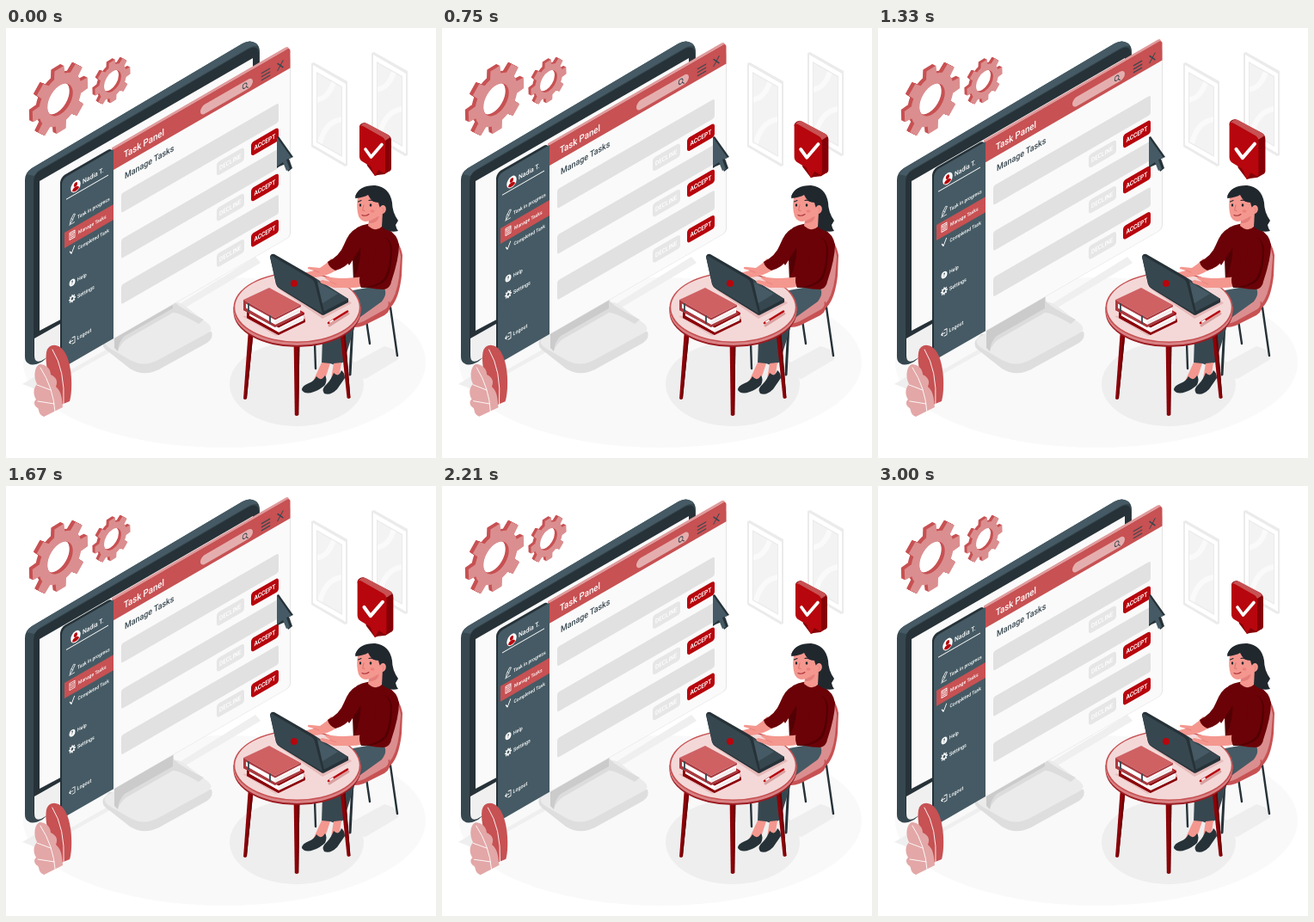
Animation of 500 by 500 pixels, one loop 3040 ms. Source, as an HTML page with a canvas:

```html
<!DOCTYPE html>
<html lang="en">
<head>
<meta charset="utf-8">
<title>Task panel</title>
<style>
html, body { margin: 0; width: 100%; height: 100%; overflow: hidden; background: #fff; }
canvas { display: block; width: 500px; height: 500px; }
</style>
</head>
<body>
<canvas id="stage"></canvas>
<script>
const LOOP = 3040, CYCLE = 3000, SLOPE = 0.577;
const canvas = document.getElementById('stage');
const dpr = Math.max(1, window.devicePixelRatio || 1);
canvas.width = canvas.height = 500 * dpr;
const ctx = canvas.getContext('2d');

const DARK = '#263238', SLATE = '#37474f', STEEL = '#455a64';
const RED = '#b7060d', ROSE = '#c75153', PINK = '#db8e8f', BLUSH = '#f4d8d8';
const SKIN = '#f4978f', WINE = '#6b0207', HAIR = '#20282d';

function fill(color, d) {
  ctx.fillStyle = color;
  ctx.fill(new Path2D(d));
}
function line(color, width, d) {
  ctx.strokeStyle = color;
  ctx.lineWidth = width;
  ctx.lineCap = ctx.lineJoin = 'round';
  ctx.stroke(new Path2D(d));
}
function oval(color, x, y, rx, ry, turn = 0) {
  ctx.fillStyle = color;
  ctx.beginPath();
  ctx.ellipse(x, y, rx, ry, turn, 0, Math.PI * 2);
  ctx.fill();
}
function group(draw, ...matrix) {
  ctx.save();
  ctx.transform(...matrix);
  draw();
  ctx.restore();
}
// Value of piecewise linear keys [[p, v], ...] at p.
function keyed(keys, p) {
  for (let i = 1; i < keys.length; i++) {
    const [p0, v0] = keys[i - 1], [p1, v1] = keys[i];
    if (p <= p1) return v0 + (v1 - v0) * (p - p0) / (p1 - p0);
  }
  return keys[keys.length - 1][1];
}

// Panel plane: x is the screen x, v is the height measured at x = 125.
const onPlane = (x, v) => v - SLOPE * (x - 125);
function slab(color, x0, x1, v0, v1, r = 0) {
  group(() => {
    ctx.fillStyle = color;
    ctx.beginPath();
    ctx.roundRect(x0, v0, x1 - x0, v1 - v0, r);
    ctx.fill();
  }, 1, -SLOPE, 0, 1, 0, 125 * SLOPE);
}
function label(text, x, v, size, color = '#fff', weight = 500) {
  group(() => {
    ctx.font = `${weight} ${size}px Roboto, "Open Sans", sans-serif`;
    ctx.fillStyle = color;
    ctx.fillText(text, 0, size * 0.36);
  }, 0.866, -0.5, 0, 1, x, onPlane(x, v));
}
function icon(x, v, draw) {
  group(draw, 0.866, -0.5, 0, 1, x, onPlane(x, v));
}

function gearPath(r, root, hole, phase) {
  const path = new Path2D();
  for (let i = 0; i < 8; i++) {
    const a = phase + i * Math.PI / 4;
    [[-0.25, root], [-0.17, r], [0.17, r], [0.25, root]].forEach(([da, q]) =>
      path.lineTo(q * Math.cos(a + da), q * Math.sin(a + da)));
    path.arc(0, 0, root, a + 0.25, a + Math.PI / 4 - 0.25);
  }
  path.closePath();
  path.moveTo(hole, 0);
  path.arc(0, 0, hole, 0, Math.PI * 2);
  return path;
}
function gear(x, y, r, root, hole, depth) {
  const path = gearPath(r, root, hole, -47 * Math.PI / 180);
  for (let k = depth; k >= 0; k -= 0.5) {
    group(() => {
      ctx.fillStyle = k ? ROSE : PINK;
      ctx.fill(path, 'evenodd');
    }, 0.866, -0.5, 0, 1, x - k, y - k * 0.5);
  }
}

function wallPicture(x, y) {
  group(() => {
    fill('#ebebeb', 'M-1 -1 L2 -2 L41 20 V118 L38 119 L-1 96Z');
    fill('#fff', 'M1 1 L39 23 V116 L1 94Z');
    fill('#ebebeb', 'M5 9 L35 26 V108 L5 91Z');
    fill('#f3f3f3', 'M6 11 L34 27 V106 L6 90Z');
    ctx.save();
    ctx.clip(new Path2D('M6 11 L34 27 V106 L6 90Z'));
    line('#fafafa', 6, 'M4 42 Q20 40 26 18 M8 96 Q14 66 36 64');
    ctx.restore();
  }, 1, 0, 0, 1, x, y);
}

function floor() {
  oval('#f9f9f9', 254, 389, 234, 99);
  fill('#efefef', 'M19 414 L36 404 L64 404 L120 372 L290 266 L296 273 L130 372 L40 422Z');
  oval('#eeeeee', 338, 414, 78, 49);
  fill('#eeeeee', 'M385 400 L440 370 Q462 376 455 386 L418 408Z');
}

function monitor() {
  fill('#dedede', 'M113 364 Q110 371 120 377 L144 396 Q160 406 178 397 L234 366 Q242 360 239 353 L120 356Z');
  fill('#ebebeb', 'M117 360 Q111 366 120 372 L146 387 Q160 394 175 387 L234 355 Q243 350 234 343 L205 321 Q196 316 186 321Z');
  fill('#dcdcdc', 'M130 335 L195 300 V317 Q199 324 230 339 L224 344 Q200 330 194 331 L140 362 Q134 366 130 375Z');
  fill('#cbcbcb', 'M126 345 L194 305 V326 L138 358 Q131 364 130 376 L126 372Z');

  fill(SLATE, 'M22 177 Q22 168 30 163 L275 18 Q284 13 291 18 Q295 21 295 28 V180 L42 388 Q31 394 26 390 Q22 388 22 382Z');
  fill(STEEL, 'M24 170 Q26 166 30 163 L275 18 Q284 13 291 18 L293 21 Q288 20 281 24 L39 165 Q35 168 33 172Z');
  fill(DARK, 'M32 180 Q32 170 39 166 L281 25 Q294 18 294 31 V230 L42 385 Q32 390 32 380Z');
  fill('#fafafa', 'M39 178 L287 35 V220 L39 352Z');
  fill('#f0f0f0', 'M33 361 L70 340 V370 L41 387 Q33 390 33 381Z');
}

function menuIcons() {
  const white = '#fff';
  icon(77, 194.5, () => line(white, 0.7, 'M-3 4 L-2 0 L2 -5 L4 -4 L0 2Z M-4 5 H3 M-1 -1 L1 1'));
  icon(77, 213, () => {
    line(white, 0.9, 'M-3.5 -4 H3.5 V4 H-3.5Z M-3.5 -2 H3.5 M-2 0 H2 M-2 2 H2');
  });
  icon(77, 231, () => line(white, 1.2, 'M-3 0 L-1 3 L3 -4'));
  icon(77, 268.3, () => {
    oval(white, 0, 0, 4, 4);
    ctx.font = '700 6.5px Roboto, sans-serif';
    ctx.fillStyle = STEEL;
    ctx.fillText('?', -1.6, 2.4);
  });
  icon(77, 287, () => {
    ctx.fillStyle = white;
    ctx.fill(gearPath(4.6, 3.2, 1.6, 0), 'evenodd');
  });
  icon(77, 336, () => line(white, 0.9, 'M0 -3.5 H3.5 V3.5 H0 M1 0 H-4 M-2 -2 L-4 0 L-2 2'));
}

function panel() {
  slab(DARK, 63, 124, 138, 360, 6);
  slab('#e09a9b', 123, 329, 138, 180, [0, 4, 0, 0]);
  slab('#e4e4e4', 125, 331, 150, 361.5, [0, 5, 5, 0]);
  slab('#fafafa', 125, 330, 141, 361, [0, 5, 5, 0]);
  slab(ROSE, 125, 330.5, 141, 165, [0, 4, 0, 0]);
  slab(STEEL, 65, 125, 141, 361, [6, 0, 0, 6]);

  label('Task Panel', 137, 154.5, 11.1);
  slab('#e5aeae', 226, 287, 150, 161, 5.5);
  icon(278, 156, () => line(SLATE, 1, 'M2.4 -0.8 A2.8 2.8 0 1 1 -3.2 -0.8 A2.8 2.8 0 1 1 2.4 -0.8 M1.6 1.3 L4 3.6'));
  icon(302, 156, () => line(SLATE, 1.3, 'M-5.5 -4 H5.5 M-5.5 0 H5.5 M-5.5 4 H5.5'));
  icon(319, 155.5, () => line(SLATE, 1.3, 'M-3.6 -4 L3.6 4 M3.6 -4 L-3.6 4'));
  label('Manage Tasks', 138, 179.5, 10.2, SLATE);

  for (let i = 0; i < 3; i++) {
    const v = 197.8 + i * 53.2;
    slab('#e1e1e1', 134, 317, v, v + 22.5, 2.5);
    slab('#e6e6e6', 245, 277, v + 28, v + 44, 3.5);
    slab(RED, 285, 317, v + 28, v + 44, 3.5);
    label('DECLINE', 248, v + 36, 7.4, '#fff', 500);
    label('ACCEPT', 288.5, v + 36, 7.5, '#fff', 700);
  }

  icon(81, 158.6, () => {
    oval('#fff', 0, 0, 6.6, 6.6);
    oval(RED, 0, -2, 2.4, 2.6);
    fill(RED, 'M-4.6 4 Q-4.4 0.6 0 0.6 Q4.4 0.6 4.6 4 Q0 7 -4.6 4Z');
  });
  label('Nadia T.', 89, 158, 7.8);
  slab('#fff', 70, 119, 167, 168);
  slab(ROSE, 68, 125, 205, 223);
  label('Task in progress', 83, 195.8, 5.9);
  label('Manage Tasks', 84, 214, 5.8);
  label('Completed Task', 83.5, 232, 5.8);
  label('Help', 83, 268.3, 6);
  label('Settings', 83, 288, 6.2);
  label('Logout', 82.5, 336, 6.2);
  menuIcons();
}

function cursor() {
  fill(DARK, 'M315 127 L317 126 L334 150 L329 152 L333 163 L328 167 L325 158 L318 161 L315 163Z');
  fill(STEEL, 'M315 127 L332 151 L326 153 L330 164 L326 166 L322 156 L315 161Z');
}

function leaves() {
  fill(ROSE, 'M62 439 C56 425 44 396 47 377 C49 367 60 366 67 375 C77 388 78 420 74 434Z');
  line('#fff', 0.9, 'M67 437 Q69 398 54 374');
  fill('#e3a7a7', 'M44 452 C37 449 39 444 37 442 C32 439 32 434 35 432 C31 425 32 419 36 414 C31 404 34 393 39 391 C47 391 52 397 52 403 C60 407 60 412 58 417 C65 423 65 432 66 441Z');
  line('#fff', 0.9, 'M57 446 Q55 418 40 395 M52 421 L36 415 M56 437 L37 434');
}

function bubble() {
  fill('#850006', 'M411 115 Q411 111 417 110 L444 124 Q448 126 448 131 V163 Q448 166 445 167 L440 170 L432 171 L429 172 L420 160Z');
  fill(ROSE, 'M411.5 113.5 L416 110.5 Q418 110 420 111 L444 124 Q446 125 447 127 L441 131Z');
  fill(RED, 'M411 116 Q411 112 415 114 L438 127 Q441 129 441 133 V166 Q441 170 438 168 L433 165 L429 172 L424 161 L414 155 Q411 153 411 149Z');
  line('#fff', 3.6, 'M418 141 L424.5 150 L437 135.5');
}

function chair() {
  line(DARK, 2.4, 'M447 325 L455 381 M419 340 L423 367 M359 366 L360 396');
  line(DARK, 3, 'M403 345 L400 403');
  fill(ROSE, 'M447 243 Q457 245 461 264 L460 288 Q457 315 447 325 L430 334 L435 300Z');
  fill(PINK, 'M446 244 Q456 247 459 266 L457 290 Q454 312 445 322 L428 332 L434 300Z');
  fill(ROSE, 'M398 338 L446 318 Q449 328 440 334 L416 346 Q405 350 396 346Z');
  fill(PINK, 'M396 336 L440 312 Q449 321 441 327 L416 341 Q406 346 396 342Z');
}

function lowerBody() {
  fill(STEEL, 'M398 306 L436 299 Q446 306 437 318 L412 336 Q404 343 392 343 L388 330Z');
  fill(SLATE, 'M368 360 L396 350 L412 332 L408 339 L393 388 Q385 394 377 390 L367 391Z');
  fill(SKIN, 'M367 389 L377 390 L371 408 L364 414 L356 413Z');
  fill(SKIN, 'M381 390 L390 389 L388 402 L378 408Z');
  fill(DARK, 'M361 405 Q358 411 352 413 Q344 416 344 421 Q348 427 358 423 Q366 420 371 415 Q374 408 371 404 Q366 412 361 405Z');
  fill(DARK, 'M381 401 Q378 409 373 414 Q366 420 370 425 Q377 428 385 420 L394 407 Q394 401 390 398 Q387 407 381 401Z');
}

function torso() {
  fill(WINE, 'M420 228 Q407 230 402 239 L390 262 L399 276 L403 270 L404 296 Q420 304 440 304 Q447 302 448 295 Q457 268 457 252 Q455 240 444 234 Q433 225 420 228Z');
  fill('#520004', 'M412 250 Q414 270 405 290 L404 268Z');
}

function head() {
  fill(HAIR, 'M406 196 Q410 183 429 183 Q446 185 449 203 Q449 214 456 224 L453 229 Q454 234 456 236 Q446 239 437 231 L428 205Z');
  fill(SKIN, 'M423 216 L438 214 L437 231 Q430 238 421 230Z');
  fill('#e57f7b', 'M422 222 L434 219 Q431 228 422 227Z');
  fill(SKIN, 'M409 197 Q407 209 410 219 Q413 225 419 225 Q431 223 437 213 L434 195 Q420 187 409 197Z');
  fill(HAIR, 'M406 198 Q408 185 427 184 Q446 185 447 204 L440 216 Q435 212 433 203 Q425 203 421 194 Q416 197 406 198Z');
  oval(SKIN, 438, 211, 3.8, 5, 0.2);
  line('#e57f7b', 0.8, 'M437 209 Q441 210 438 214');
  oval(HAIR, 412, 206, 1.2, 1.7);
  oval(HAIR, 424, 206, 1.3, 1.8);
  line(HAIR, 1.1, 'M409.5 202 L413 200.5 M422 200.5 Q425 199.5 428 201.5');
  line('#da716d', 1, 'M416 206 L414.5 212 L417 212.5');
  line('#a7333a', 1.1, 'M414 217.5 Q418 219.5 422 216.5');
  oval('#ee817d', 426, 213, 2.5, 1.8);
}

function leg(x0, y0, x1, y1, w) {
  fill('#8c0309', `M${x0 - w} ${y0} H${x0 + w} L${x1 + w * 0.65} ${y1} Q${x1} ${y1 + 2} ${x1 - w * 0.65} ${y1}Z`);
  fill('#6c0005', `M${x0 + w * 0.3} ${y0} H${x0 + w} L${x1 + w * 0.65} ${y1} H${x1 + w * 0.2}Z`);
}
function table() {
  leg(285, 350, 278, 431, 3);
  leg(391, 350, 398.5, 430, 3);
  leg(338, 364, 338, 450, 3.4);
  fill('#9c1c22', 'M264.5 325 H412.5 V330 A74 41 0 0 1 264.5 330Z');
  fill('#d98385', 'M264.5 324 H412.5 V328 A74 41 0 0 1 264.5 328Z');
  oval(ROSE, 338.5, 325, 74, 41);
  oval(BLUSH, 338.5, 324.8, 72.3, 39.6);
}

function book(x, y, cover, edge) {
  group(() => {
    fill(edge, 'M0 8 L30 -5 L68 14 V17 L37 32 L0 12Z');
    fill('#fff', 'M2 4 L31 -4 L66 10 V15 L37 29 L2 9Z');
    line('#d8c4c4', 0.5, 'M37 26 L65 12 M37 27.5 L65 13.5');
    fill(edge, 'M0 1 V12 L37 32 V29 L3 10 V2Z');
    fill(cover, 'M0 0 L30 -14 L67 6 L37 21Z');
    fill(edge, 'M0 0 L37 21 L67 6 V8 L37 23.5 L0 3Z');
  }, 1, 0, 0, 1, x, y);
}
function desk() {
  fill('#e6b9b9', 'M275 335 L314 358 L349 338 L344 330Z');
  book(280, 325, RED, '#8a050b');
  book(276, 316, '#cf6163', '#a93a3f');
  line(SLATE, 1.8, 'M282 321 V329 M307 335 V343');
  line('#d9a0a0', 3, 'M376 346 L398 332');
  line(RED, 2.6, 'M375 343 L397 329.5');
  line('#fff', 2, 'M377 341.8 L380 340');
}

function laptopAndArms() {
  fill('#e6b9b9', 'M318 304 L368 338 L402 320 L396 314Z');
  fill(DARK, 'M318 299 L360 291 L398 315 V319 L369 334 L318 302Z');
  fill(SLATE, 'M318 299 L355 288 L398 315 L369 330Z');
  fill(STEEL, 'M340 300 L360 294 L386 309 L368 320Z');

  fill(SKIN, 'M378 268 L388 278 Q382 284 373 287 Q364 290 357 290 L349 288 Q346 286 350 284 L358 282 L351 280 Q350 277 355 278 L365 279 Q372 275 378 268Z');
  fill(WINE, 'M406 234 L416 247 Q408 267 394 277 Q388 281 383 282 Q375 278 374 272 Q388 265 393 252 Q399 237 406 234Z');

  fill(SKIN, 'M416 289 L417 300 Q403 303 394 302 L381 302 L367 297 Q363 294 368 293 L377 295 L371 291 Q372 288 377 290 L388 291 Q400 291 416 289Z');
  line('#e57f7b', 0.8, 'M377 295 L384 298 M358 282 L364 284');
  fill('#520004', 'M432 244 Q446 240 449 256 Q449 281 442 293 Q432 303 413 302 Q410 295 412 288 Q424 286 428 277Z');
  fill(WINE, 'M431 243 Q445 240 447 256 Q447 279 440 291 Q431 301 413 301 Q410 294 412 288 Q424 285 427 276Z');

  fill(DARK, 'M307 266 Q308 262 312 263 L357 289 Q361 291 362 295 L370 330 L368 334 L318 303 Q315 301 314 298Z');
  fill(SLATE, 'M307 266 Q308 264 311 266 L354 291 Q358 293 359 297 L368 332 L318 302 Q315 300 314 297Z');
  oval(RED, 335, 297, 4, 4);
}

function draw(time) {
  const p = (time % LOOP % CYCLE) / CYCLE;
  const lift = keyed([[0, 0], [0.5, -10], [1, 0]], p);
  const sway = keyed([[0, 0], [0.25, 1], [0.75, -1], [1, 0]], p) * Math.PI / 180;
  const beat = keyed([[0, 1], [0.1, 1.3], [0.3, 1], [0.4, 1], [0.5, 1.3], [0.6, 1], [1, 1]], p);

  ctx.setTransform(dpr, 0, 0, dpr, 0, 0);
  ctx.fillStyle = '#fff';
  ctx.fillRect(0, 0, 500, 500);

  floor();
  wallPicture(356, 42);
  wallPicture(426, 30);
  gear(63, 83.5, 37.5, 28.5, 17, 4);
  gear(124, 62, 24, 18.5, 11.5, 3);
  monitor();
  group(panel, 1, 0, 0, 1, 0, lift);
  cursor();

  ctx.save();
  ctx.translate(54, 410);
  ctx.rotate(sway);
  ctx.translate(-54, -410);
  leaves();
  ctx.restore();

  chair();
  lowerBody();
  torso();
  head();
  table();
  desk();
  laptopAndArms();
  group(bubble, beat, 0, 0, beat, 429.5 * (1 - beat), 141 * (1 - beat));
}

const start = performance.now();
function tick() {
  draw(performance.now() - start);
  requestAnimationFrame(tick);
}
tick();
</script>
</body>
</html>
```
